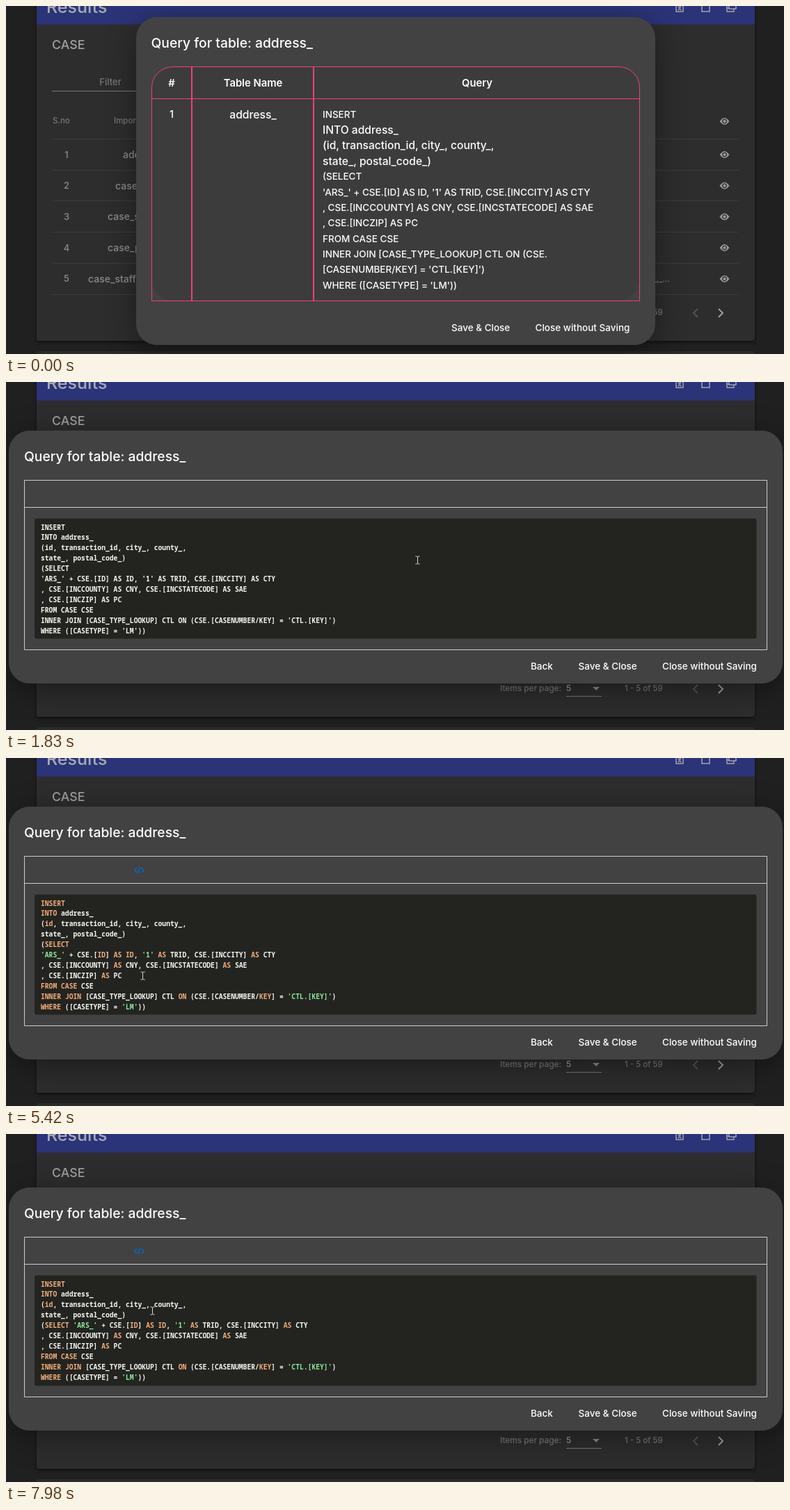
Recreate the animation shown at these times as an HTML page. Size 1118 by 501 pixels, loop 8000 ms.

```html
<!DOCTYPE html>
<html lang="en">
<head>
<meta charset="utf-8">
<title>Query editor</title>
<style>
html, body { margin: 0; width: 100%; height: 100%; overflow: hidden; background: #202020; }
svg { display: block; font-family: Inter, "Open Sans", sans-serif; font-weight: 500; }
text { white-space: pre; }
.code { font: bold 9.7px "Noto Sans Mono", "DejaVu Sans Mono", monospace; fill: #f8f8f2; }
.dialog { fill: #424242; filter: drop-shadow(0 9px 22px rgba(0,0,0,.4)); }
.kw { fill: #f2ae7c; }
.str { fill: #8be99a; }
</style>
</head>
<body>
<svg width="1118" height="501" viewBox="0 0 1118 501">
  <g id="page"></g>
  <g id="dialog"></g>
  <g id="pointer"></g>
</svg>
<script>
const LOOP = 8000, SELECT = 1600, OPEN = 1830, COLORED = 2800, FOCUS = 4889, MERGE = 7840;
const CHAR = 5.82, LINE = 14.9;
const PINK = '#ee4079';
const MID = 'text-anchor="middle"';
const $ = id => document.getElementById(id);

// y is the middle of the capitals
const text = (x, y, s, size, fill = '#fff', extra = '') =>
  `<text x="${x}" y="${y + size * .36}" font-size="${size}" fill="${fill}" ${extra}>${s}</text>`;
const rect = (x, y, w, h, fill, extra = '') =>
  `<rect x="${x}" y="${y}" width="${w}" height="${h}" fill="${fill}" ${extra}/>`;
const path = (d, stroke, width = 1, fill = 'none') =>
  `<path d="${d}" stroke="${stroke}" stroke-width="${width}" fill="${fill}"/>`;

const query = [
  'INSERT', 'INTO address_', '(id, transaction_id, city_, county_,', 'state_, postal_code_)', '(SELECT ',
  "'ARS_' + CSE.[ID] AS ID, '1' AS TRID, CSE.[INCCITY] AS CTY",
  ', CSE.[INCCOUNTY] AS CNY, CSE.[INCSTATECODE] AS SAE',
  ', CSE.[INCZIP] AS PC', 'FROM CASE CSE',
  "INNER JOIN [CASE_TYPE_LOOKUP] CTL ON (CSE.[CASENUMBER/KEY] = 'CTL.[KEY]')",
  "WHERE ([CASETYPE] = 'LM'))"
];
const merged = [...query.slice(0, 4), query[4] + query[5], ...query.slice(6)];
const wrapped = query.flatMap(s => s.split(/(?<=\(CSE\.)(?=\[CASEN)/));

const highlight = s => s.replace(
  /'[^']*'|\b(INSERT|INTO|id|SELECT|ID|AS|FROM|CASE|INNER|JOIN|ON|KEY|WHERE)\b/g,
  m => `<tspan class="${m[0] === "'" ? 'str' : 'kw'}">${m}</tspan>`);

function eye(y) {
  return `<g transform="translate(1032.5 ${y})">` +
    path('M-6.5 0Q-3.5-4.5 0-4.5T6.5 0Q3.5 4.5 0 4.5T-6.5 0Z', '#999', 1, '#999') +
    '<circle r="2.8" fill="#999" stroke="#2d2d2d" stroke-width="1.3"/></g>';
}

function page() {
  const gray = '#8c8c8c', dim = '#777';
  let s = rect(44, -20, 1032, 502, '#2d2d2d', 'rx="4" style="filter:drop-shadow(0 2px 2px #0008)"') +
    rect(44, 0, 1032, 26.5, '#2b3478') + rect(44, 497, 1032, 8, '#2a2a2a') +
    text(58, 0.5, 'Results', 25, '#a9a9b4') +
    path('M963-2V8H973V-2M966 0L970 6M970 0L966 6M1000-2V8H1011V-2M1036-2V3H1039M1039-2H1049V4H1039ZM1036 3V8H1046V4', '#a3a3b0', 1.5) +
    text(66, 56, 'CASE', 17.8, '#a0a0a0') +
    text(150, 109, 'Filter', 13, dim, MID) + rect(66, 122, 200, 1, '#777') +
    text(67, 165, 'S.no', 11.5, dim) + text(155, 165, 'Import Table', 11.5, dim) + eye(166);
  const names = [[168, 'address_'], [157, 'case_type'], [146, 'case_status'], [146, 'case_party'], [118, 'case_staff_role']];
  names.forEach(([x, name], i) => {
    const y = 214 + i * 44.7;
    s += text(87, y, i + 1, 13, gray, MID) + text(x, y, name, 14, gray) + eye(y);
  });
  for (let i = 0; i < 6; i++) s += rect(66, Math.round(191 + i * 44.7), 987, 1, '#3c3c3c');
  return s + text(930, 393, '_,_...', 11, gray) +
    text(710, 441, 'Items per page:', 11.8, dim) + text(805, 441, '5', 12, '#999') +
    rect(805, 452, 51, 1, '#777') + '<path d="M843 439h10l-5 5z" fill="#888"/>' +
    text(889, 441, '1 - 5 of 59', 11.5, dim) +
    path('M994 436L988 442L994 448', '#555', 1.8) + path('M1024 436L1030 442L1024 448', '#a5a5a5', 1.8);
}

function tableDialog(hover, selected) {
  let s = rect(187, 16, 746, 472, '', 'class="dialog" rx="30"') +
    text(208.5, 53, 'Query for table: address_', 19.3) +
    rect(209, 87, 701, 337, '#3c3c3c', 'rx="30"') +
    rect(443, 134, 467, 290, '#793f4f', `opacity="${hover}"`) +
    path('M209.5 424.5V117.5A30 30 0 0 1 239.5 87.5H880.5A30 30 0 0 1 910.5 117.5V424.5ZM209 133.5H910', PINK) +
    path('M267 87V424M442 87V424', PINK, 2);
  for (const [x, name] of [[238, '#'], [355, 'Table Name'], [677, 'Query']])
    s += text(x, 110.5, name, 14.8, '#fff', MID + ' font-weight="600"');
  s += text(238, 156, '1', 14.5, '#fff', MID) + text(355, 156, 'address_', 15.7, '#fff', MID);
  if (selected) s += rect(510, 235, 3.5, 21, '#1a66da');
  wrapped.forEach((line, i) => {
    s += text(455, 156 + i * 22.36, line, /[a-z]{3}/.test(line) ? 15.6 : 13.5);
  });
  return s + text(640, 463.5, 'Save &amp; Close', 13.5) + text(760.5, 463.5, 'Close without Saving', 13.5);
}

function editorDialog(colored, focused, lines, caret) {
  const height = lines.length * LINE + 200.6;
  const y = Math.round(252.2 - height / 2), end = Math.round(252.2 + height / 2);
  let s = rect(4, y, 1112, end - y, '', 'class="dialog" rx="30"') +
    text(26, y + 37, 'Query for table: address_', 19.3) +
    path(`M26.5 ${y + 71.5}H1093.5V${end - 48.5}H26.5ZM26 ${y + 110.5}H1093`, '#ccc') +
    rect(41, y + 126.5, 1037.5, end - 64.5 - y - 126.5, '#23241f', 'rx="3"');
  if (focused) {
    const m = y + 91.5;
    s += path(`M188 ${m - 3.5}l-3.5 3.5l3.5 3.5M194.5 ${m - 3.5}l3.5 3.5l-3.5 3.5M192.5 ${m - 5}l-2.5 10`, '#0b66c4', 1.6);
  }
  lines.forEach((line, i) => {
    s += `<text class="code" x="50" y="${y + 142.5 + i * LINE}">${colored ? highlight(line) : line}</text>`;
  });
  if (caret) {
    const [row, col, color] = caret;
    s += rect(Math.floor(50 + col * CHAR), Math.round(y + 131.7 + row * LINE), 1, 13, color);
  }
  for (const [x, label] of [[754, 'Back'], [822.5, 'Save &amp; Close'], [943, 'Close without Saving']])
    s += text(x, end - 24.5, label, 13.5);
  return s;
}

// start, end, steps, evenly timed way points
const moves = [
  [520, 1060, 6, [[690, 400], [610, 290], [591, 256]]],
  [2250, 3020, 8, [[575, 262], [430, 285], [230, 275], [140, 258]]],
  [3140, 3140, 1, [[150, 259]]],
  [3350, 4130, 8, [[158, 262], [180, 268], [215, 277], [260, 287], [310, 296], [356, 304], [300, 320], [240, 327]]],
  [4220, 5000, 8, [[232, 333], [205, 340], [198, 325], [196, 313]]],
  [5420, 5670, 3, [[196, 313], [206, 288], [213, 269]]],
  [5940, 6230, 4, [[210, 268], [206, 266]]],
  [6450, 6540, 2, [[140, 262], [94, 272]]],
  [6870, 7080, 3, [[120, 270], [180, 258], [210, 254]]]
];

function pointerAt(t) {
  const move = moves.filter(m => m[0] <= t).pop();
  if (!move) return null;
  const [start, end, steps, pts] = move, last = pts.length - 1;
  if (t >= end) return pts[last];
  const step = Math.floor((t - start) / (end - start) * (steps - 1) + .1);
  const u = step / (steps - 1) * last, i = Math.min(last - 1, Math.floor(u));
  return pts[i].map((v, k) => v + (pts[i + 1][k] - v) * (u - i));
}

const hand = path('M-1.5 1Q0-1 1.5 1V6Q3 5 4 6.5Q5.5 5.6 6.5 7Q8.5 6.5 8.5 9V12Q8 14 7 17H-1Q-2 14-5 9Q-5 7-1.5 10Z', '#333', 1, '#fff');
const beam = path('M-3-5.5H-1L0-4.5L1-5.5H3M0-4.5V4.5M-3 5.5H-1L0 4.5L1 5.5H3', '#d8d8d8');

function caretAt(t) {
  const within = (a, b) => t >= a && t < b;
  if (within(FOCUS, 5420) || within(5940, 6450)) return [7, 20, '#f8f8f2'];
  if (within(6540, 6870) || within(7420, 7980)) return [4, 8, '#f2ae7c'];
}

let shown = '';
function draw(now) {
  const t = now % LOOP;
  const hover = Math.max(0, Math.min(1, (Math.floor((t - 520) / 108) + 1) / 3));
  const html = t < OPEN ? tableDialog(hover, t >= SELECT)
    : editorDialog(t >= COLORED, t >= FOCUS, t < MERGE ? query : merged, caretAt(t));
  if (html !== shown) $('dialog').innerHTML = shown = html;
  const p = pointerAt(t);
  $('pointer').innerHTML = p ? t < OPEN ? hand : beam : '';
  if (p) $('pointer').setAttribute('transform', `translate(${Math.round(p[0]) + .5} ${Math.round(p[1]) + .5})`);
  requestAnimationFrame(draw);
}

$('page').innerHTML = page();
requestAnimationFrame(draw);
</script>
</body>
</html>
```
